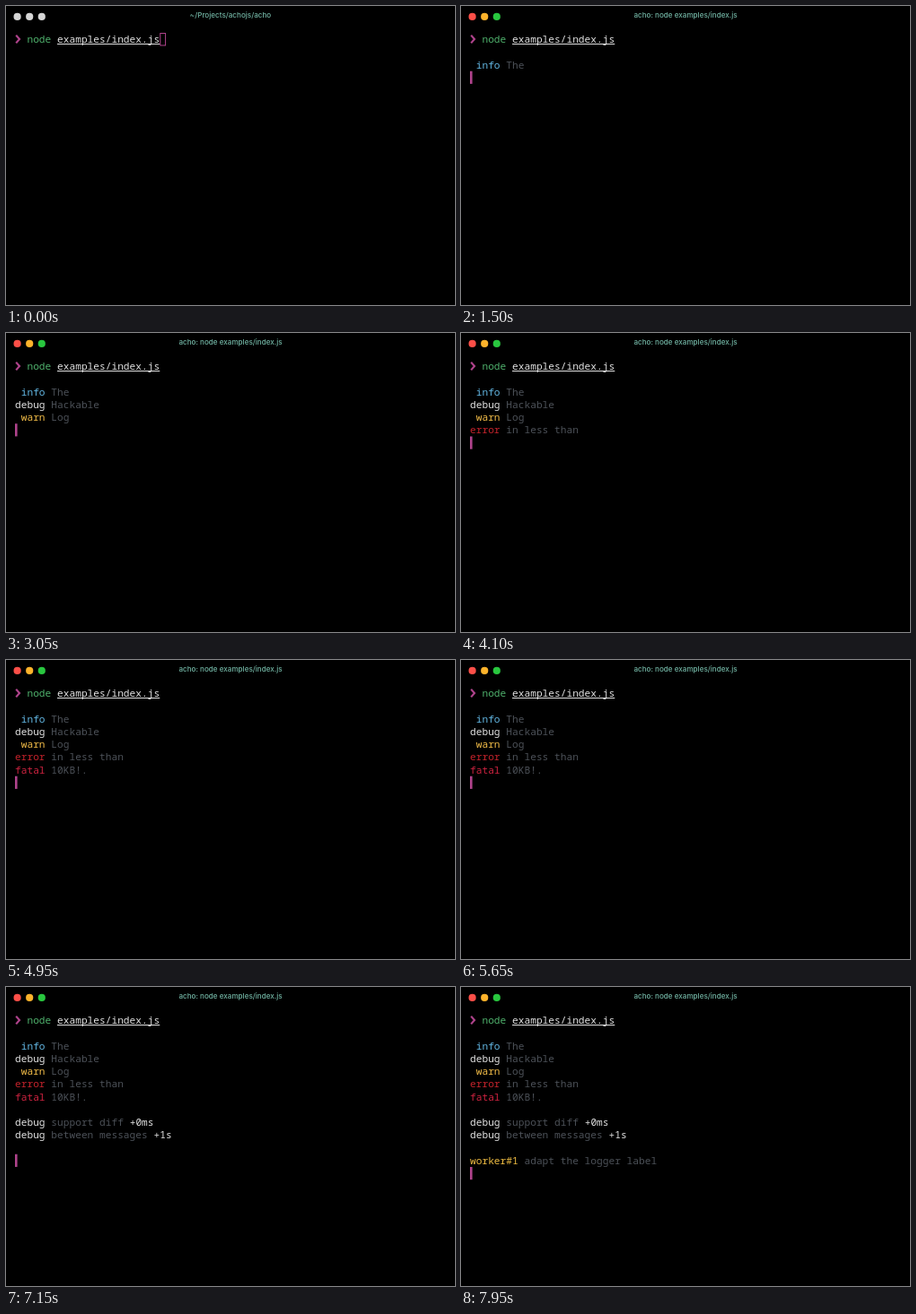
An HTML page that plays this animation: 500x334 px, repeating every 8000 ms.

```html
<!DOCTYPE html>
<html lang="en">
<head>
<meta charset="utf-8">
<title>Terminal logger</title>
<style>
  html, body { margin: 0; width: 100%; height: 100%; overflow: hidden; background: #000; }
  svg { display: block; width: 500px; height: 334px; }
  text { font: 11.2px "Noto Sans Mono", "DejaVu Sans Mono", monospace; }
  .label { font-weight: 500; }
  #title { font: 500 8.1px Inter, Roboto, sans-serif; fill: #72b5a4; text-anchor: middle; }
</style>
</head>
<body>
<svg id="stage" viewBox="0 0 500 334">
  <g id="buttons">
    <circle cx="12.6" cy="11.9" r="4.1"/>
    <circle cx="26.2" cy="11.9" r="4.1"/>
    <circle cx="39.8" cy="11.9" r="4.1"/>
  </g>
  <text id="title" x="250" y="13"></text>
  <path d="M11.2 32.6 L15 37 L11.2 41.4" fill="none" stroke="#b0438c" stroke-width="2.2"/>
  <rect id="cursor"/>
</svg>
<script>
const LOOP = 8000, FOCUS = 250, ENTER = 600, FIRST_LOG = 900, LOG_GAP = 1000;
const LEFT = 10, TOP = 37, CELL = 6.72, PITCH = 14.25;
const DIM = '#4c5158', WHITE = '#e2e2e2', PINK = '#b0438c';
const IDLE = ['#d6d6d6', '#d6d6d6', '#d6d6d6'];
const ACTIVE = ['#fc4f48', '#fdb32b', '#29c73f'];

// label, label colour, message, time difference, row, cursor row afterwards
const logs = [
  [' info', '#62b6e2', 'The', '', 2, 3],
  ['debug', WHITE, 'Hackable', '', 3, 4],
  [' warn', '#f3bd48', 'Log', '', 4, 5],
  ['error', '#c4232b', 'in less than', '', 5, 6],
  ['fatal', '#cf2340', '10KB!.', '', 6, 7],
  ['debug', WHITE, 'support diff', '+0ms', 8, 9],
  ['debug', WHITE, 'between messages', '+1s', 9, 11],
  ['worker#1', '#f0bd42', 'adapt the logger label', '', 11, 12]
];

const stage = document.getElementById('stage');
const title = document.getElementById('title');
const cursor = document.getElementById('cursor');
const buttons = [...document.getElementById('buttons').children];

function add(name, attributes, parent = stage) {
  const node = document.createElementNS(stage.namespaceURI, name);
  for (const key in attributes) node.setAttribute(key, attributes[key]);
  return parent.appendChild(node);
}

function write(string, col, row, fill, parent, className = '') {
  const indent = string.length - string.trimStart().length;
  add('text', {
    x: LEFT + (col + indent) * CELL, y: TOP + row * PITCH + 4, fill, class: className
  }, parent).textContent = string.trim();
}

function place(node, x, y, width, height) {
  Object.entries({ x, y, width, height }).forEach(([key, value]) => node.setAttribute(key, value));
}

write('node', 2, 0, '#4fb16c');
write('examples/index.js', 7, 0, WHITE);
add('rect', { x: LEFT + 7 * CELL, y: 42, width: 17 * CELL, height: 1, fill: WHITE });

const groups = logs.map(([label, color, message, diff, row]) => {
  const group = add('g', {});
  const start = label.length + 1;
  write(label, 0, row, color, group, 'label');
  write(message, start, row, DIM, group);
  if (diff) write(diff, start + message.length + 1, row, WHITE, group);
  return group;
});

function draw(time) {
  const focused = time >= FOCUS, running = time >= ENTER;
  const shown = Math.max(0, Math.floor((time - FIRST_LOG) / LOG_GAP) + 1);

  buttons.forEach((button, i) => button.setAttribute('fill', (focused ? ACTIVE : IDLE)[i]));
  title.textContent = running ? 'acho: node examples/index.js' : '~/Projects/achojs/acho';
  groups.forEach((group, i) => group.setAttribute('display', i < shown ? 'inline' : 'none'));

  const row = shown ? logs[shown - 1][5] : running ? 1 : 0;
  const x = running ? LEFT : LEFT + 24 * CELL;
  const y = TOP + row * PITCH - 7;
  if (focused) place(cursor, x, y, 2.6, 14.2);
  else place(cursor, x + 0.5, y + 0.5, 5.8, 13.5);
  cursor.setAttribute('fill', focused ? PINK : 'none');
  cursor.setAttribute('stroke', focused ? 'none' : PINK);
}

const began = performance.now();
function tick() {
  draw((performance.now() - began) % LOOP);
  requestAnimationFrame(tick);
}
tick();
</script>
</body>
</html>
```
